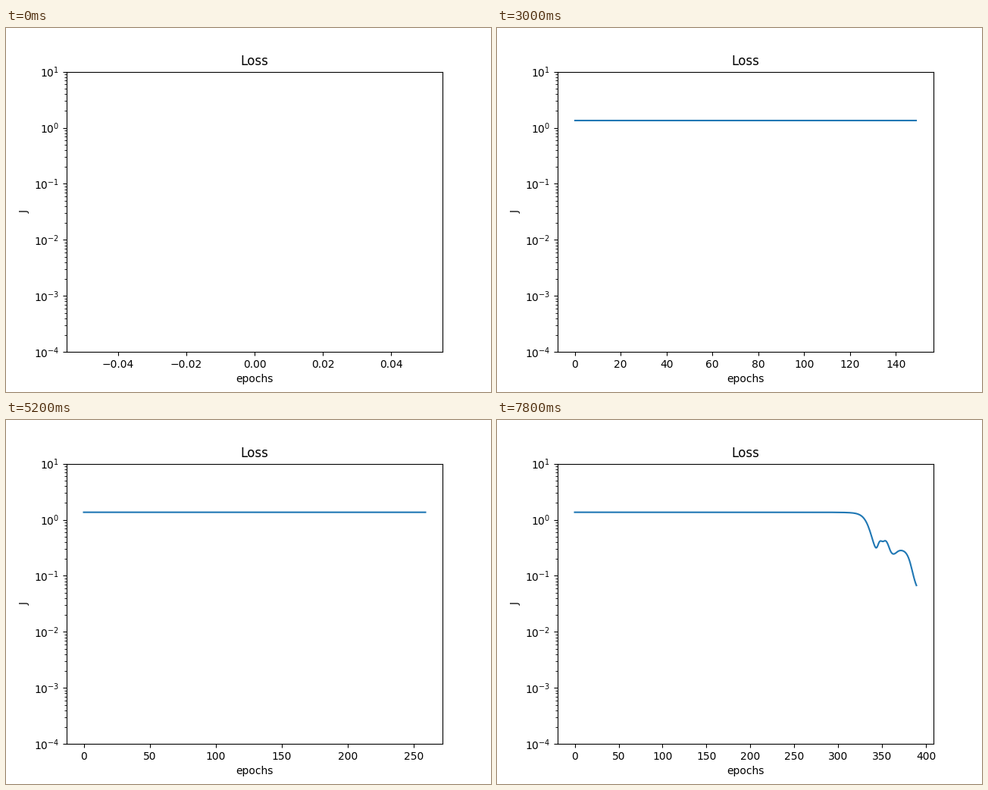
A matplotlib script for the animation above (8000 ms loop, 640x480 px).

```python
import numpy as np
import matplotlib.pyplot as plt
from matplotlib.animation import FuncAnimation

FRAMES, INTERVAL = 40, 200
EPOCHS_PER_FRAME = 10

# Smooth steps of log10(loss): height, steepness, middle epoch
STEPS = [
    (-.02, .08, 330),     # slow start of the descent
    (-1.0, .215, 339.5),  # escape from the plateau
    (.405, .8, 345.2),    # rebounds
    (.10, 1.0, 352.3),
    (-.27, .6, 357.9),
    (.12, .5, 366),
    (-.78, .33, 384.4),   # second descent
]


def loss_curve(t):
    level = .1335 - 4.5e-9 * t ** 2
    for height, rate, middle in STEPS:
        level = level + height / (1 + np.exp(-rate * (t - middle)))
    return 10 ** level


epochs = np.arange((FRAMES - 1) * EPOCHS_PER_FRAME)
loss = loss_curve(epochs)

plt.rcParams["text.kerning_factor"] = 6
fig, ax = plt.subplots(figsize=(6.4, 4.8), dpi=100)
line, = ax.semilogy([], [])
ax.set_title("Loss")
ax.set_xlabel("epochs")
ax.set_ylabel("J")
ax.set_ylim(1e-4, 10)


def draw(frame):
    n = frame * EPOCHS_PER_FRAME
    line.set_data(epochs[:n], loss[:n])
    last = max(n - 1, 0)
    margin = .05 * last or .055
    ax.set_xlim(-margin, last + margin)
    return line,


def reset():
    return draw(0)


anim = FuncAnimation(fig, draw, frames=FRAMES, init_func=reset,
                     interval=INTERVAL, repeat=True, repeat_delay=0)
plt.show()
```
